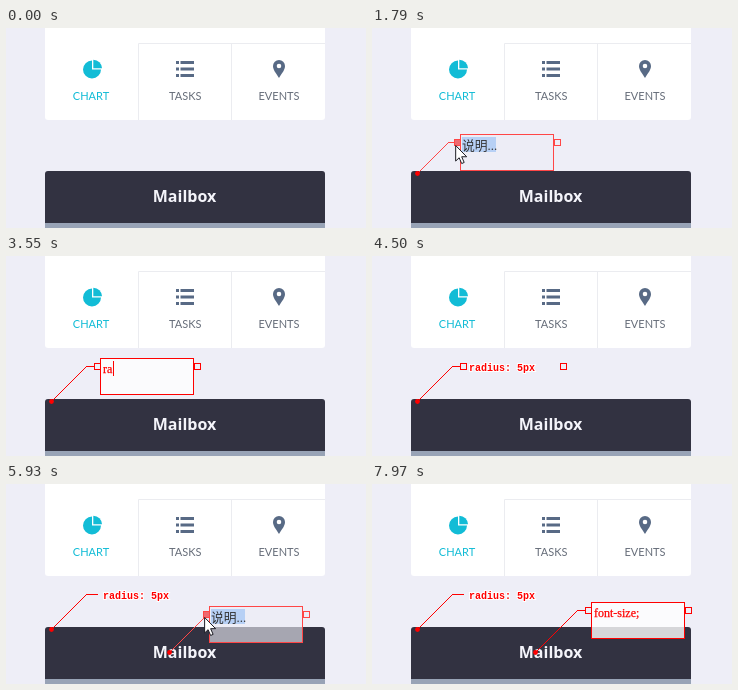
Recreate the animation shown at these times as an HTML page. Size 360 px wide and 200 px high, loop 8 s.

```html
<!DOCTYPE html>
<html lang="en">
<head>
<meta charset="utf-8">
<title>Annotating a design</title>
<style>
html, body { margin: 0; width: 100%; height: 100%; overflow: hidden; background: #eeeef7; }
svg { display: block; width: 360px; height: 200px; }
text { white-space: pre; }
.tab { font: 11px Lato, sans-serif; text-anchor: middle; fill: #666d79; }
.tab.on { fill: #12bcd6; }
.title { font: 600 16px "Noto Sans", sans-serif; text-anchor: middle; fill: #f4f4fa; }
.edit { font: 12px "Liberation Serif", serif; fill: #f00; stroke: #f00; stroke-width: .25px; }
.label { font: 12.8px "Liberation Serif", "Noto Sans CJK SC", "Noto Sans CJK", serif; fill: #333; }
.note { font: bold 10px "Liberation Mono", monospace; fill: #f00; stroke: #fff; stroke-width: 2px; paint-order: stroke; }
polyline { fill: none; shape-rendering: crispEdges; }
</style>
</head>
<body>
<svg viewBox="0 0 360 200">
  <rect x="39" y="-10" width="280" height="102" rx="3" fill="#fff"/>
  <path d="M319 15.5H132.5V92M225.5 15.5V92" fill="none" stroke="#ebecf0"/>
  <g fill="#12bcd6">
    <path d="M86 32.500A9 9 0 1 0 95 41.500H86Z"/>
    <path d="M87.300 31.700A8.700 8.700 0 0 1 96 40.300H87.300Z"/>
  </g>
  <g fill="#586a85">
    <path d="M170 34.500h18M170 41h18M170 47.500h18" stroke="#586a85" stroke-width="3" stroke-dasharray="3 1.5 13.5"/>
    <path fill-rule="evenodd" d="M273 50C270 45 267 42 267 38a6 6 0 0 1 12 0C279 42 276 45 273 50ZM273 35.700a2.300 2.300 0 1 0 0 4.600a2.300 2.300 0 1 0 0-4.600Z"/>
  </g>
  <text class="tab on" x="85" y="72">CHART</text>
  <text class="tab" x="179.300" y="72">TASKS</text>
  <text class="tab" x="273" y="72">EVENTS</text>
  <rect x="39" y="143" width="280" height="60" rx="3" fill="#323241"/>
  <rect x="39" y="195" width="280" height="5" fill="#98a3b6"/>
  <text class="title" x="178.500" y="174">Mailbox</text>
  <g id="live"></g>
</svg>
<script>
const LOOP = 8000;
const live = document.getElementById('live');
const pen = document.createElement('canvas').getContext('2d');
pen.font = '12px "Liberation Serif", serif';

// The pointer starts at `from`; each move is [start, end, x, y].
const notes = [
  { dot: [45.5, 145.5], text: 'radius: 5px', key: 3390, gap: 100,
    placed: 1520, edit: 2700, done: 4500, clear: 4960, from: [139, 184],
    moves: [[890, 1360, 43, 149], [1520, 1850, 84.5, 116], [2180, 2540, 89.5, 113], [2700, 2760, 314, 122]] },
  { dot: [163.5, 168.5], text: 'font-size;', key: 6960, gap: 68,
    placed: 5620, edit: 6500, done: LOOP, clear: LOOP, from: [346, 64],
    moves: [[4960, 5560, 163, 170], [5620, 5930, 198, 133], [5930, 6200, 214.5, 129], [6500, 6560, 308, 116]] }
];

const clamp = (v, lo, hi) => Math.max(lo, Math.min(hi, v));
const easeOut = k => 1 - (1 - k) ** 2;

function pointerAt({ from, moves }, t) {
  let [x, y] = from;
  for (const [start, end, toX, toY] of moves) {
    const k = easeOut(clamp((t - start) / (end - start), 0, 1));
    x += (toX - x) * k;
    y += (toY - y) * k;
  }
  return [x, y];
}

// The box hangs on the pointer, but never closer to the dot than its default place.
function boxAt(note, t) {
  const [px, py] = pointerAt(note, Math.min(t, note.edit));
  const [dx, dy] = note.dot;
  const x = Math.round(Math.max(dx + 26.5, px + 4.5));
  const y = Math.round(Math.min(dy - 17.5, py - 11));
  return { x, y, h: y === dy - 17.5 ? 43 : 36 };
}

const box = (x, y, w, h, stroke, fill = 'none', alpha = 1) =>
  `<rect x="${x + .5}" y="${y + .5}" width="${w}" height="${h}" fill="${fill}" fill-opacity="${alpha}" stroke="${stroke}"/>`;

const bar = (x, y, w, fill) => `<rect x="${x}" y="${y}" width="${w}" height="15" fill="${fill}"/>`;

const label = (kind, x, y, text) => `<text class="${kind}" x="${x}" y="${y}">${text}</text>`;

function drawNote(note, t) {
  if (t < note.placed) return '';
  const { x, y, h } = boxAt(note, t), [dx, dy] = note.dot;
  const dragging = t < note.edit, handles = t < note.clear;
  const red = dragging ? '#ff4646' : '#f00';
  const endX = x - (handles ? 5.5 : 2.5), endY = y + 8.5;
  let out = `<polyline points="${dx},${dy} ${dx + dy - endY},${endY} ${endX},${endY}" stroke="${red}"/>
    <circle cx="${dx}" cy="${dy}" r="2.4" fill="#f00"/>`;

  if (dragging) {
    out += box(x, y, 93, h, red, '#eeeef5', .62) + bar(x + 2, y + 3, 34, '#b7d0f5') +
      label('label', x + 2, y + 16, '说明...');
  } else if (t < note.done) {
    const count = clamp(Math.floor((t - note.key) / note.gap) + 1, 0, note.text.length);
    const text = note.text.slice(0, count);
    out += box(x, y, 93, h, red, '#fff', .8) + label('edit', x + 3, y + 15, text);
    if (count < note.text.length) out += bar(Math.round(x + 3.4 + pen.measureText(text).width), y + 3, 1, red);
  } else {
    out += label('note', x + 3, y + 13, note.text);
  }

  if (handles) {
    out += box(x - 6, y + 5, 6, 6, red, dragging ? '#ee6a70' : 'none') + box(x + 94, y + 5, 6, 6, red);
  }
  return out;
}

function drawPointer(note, t) {
  const { moves } = note;
  if (t < moves[0][0] || t >= moves.at(-1)[1]) return '';
  return `<path transform="translate(${pointerAt(note, t)})" fill="#fff" stroke="#1c1c24"
    d="M.5 .5V16L4 12.700L6.500 18.500L9 17.400L6.500 11.700H11.500Z"/>`;
}

function draw(now) {
  const t = now % LOOP;
  live.innerHTML = [drawNote, drawPointer].flatMap(part => notes.map(note => part(note, t))).join('');
  requestAnimationFrame(draw);
}
requestAnimationFrame(draw);
</script>
</body>
</html>
```
